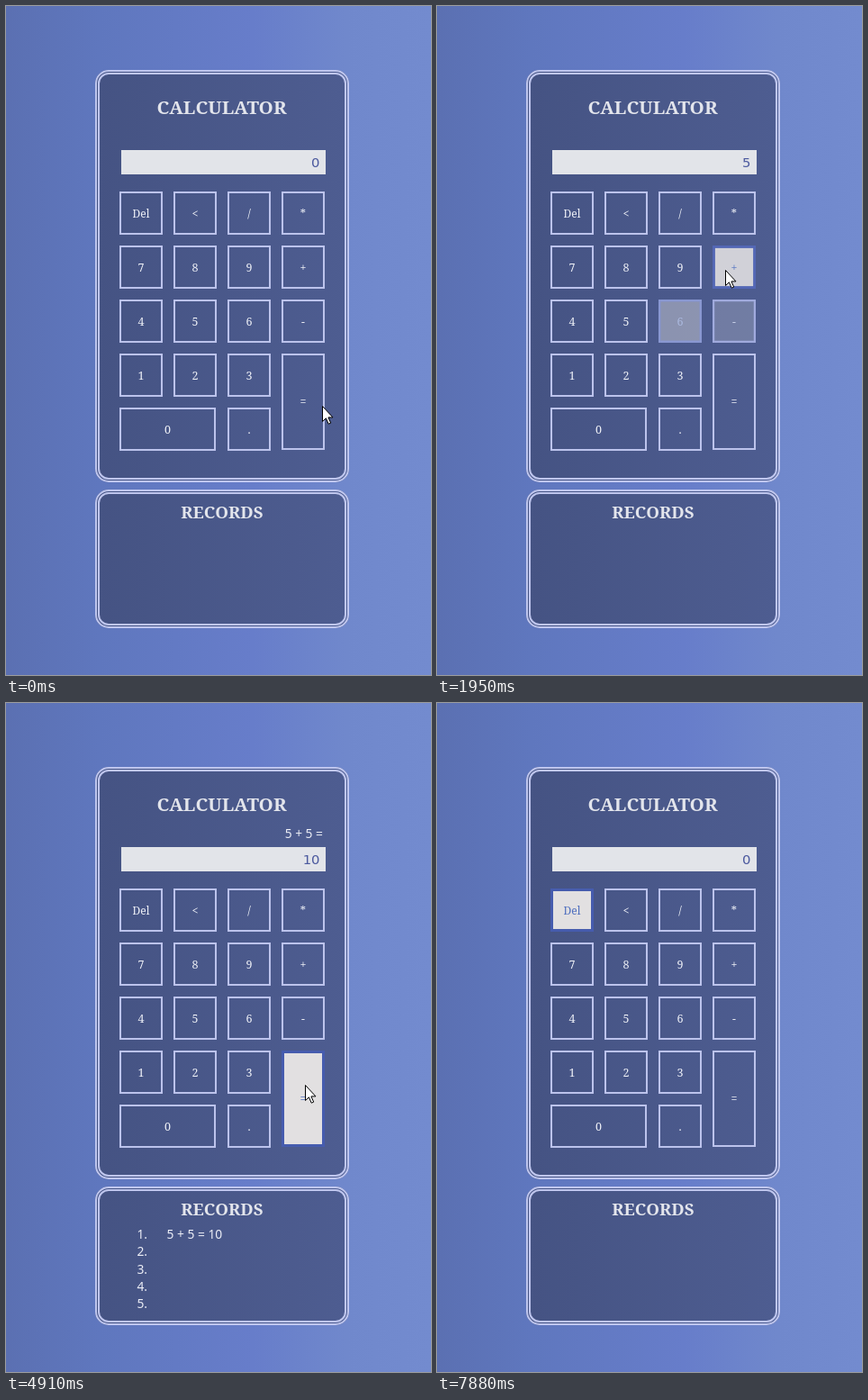
An HTML page that plays this animation: 472 by 743 pixels, repeating every 8 s.

```html
<!DOCTYPE html>
<html lang="en">
<head>
<meta charset="utf-8">
<title>Calculator</title>
<style>
  html, body { margin: 0; width: 100%; height: 100%; overflow: hidden; }
  svg { display: block; width: 100%; height: 100%; }
  .line { fill: none; stroke: #bfc6ee; stroke-width: 2; }
  .head { font: bold 20.7px "Noto Serif", serif; fill: #e3e5ec; text-anchor: middle; }
  .key { font: 12.5px "Noto Serif", serif; text-anchor: middle; }
  .note { font: 13.8px "Noto Sans", sans-serif; fill: #eceef6; }
  .end { text-anchor: end; }
  #display { font: 14.8px "DejaVu Sans", sans-serif; fill: #4c5a9f; }
</style>
</head>
<body>
<svg viewBox="0 0 472 743" preserveAspectRatio="none">
  <defs>
    <linearGradient id="sky">
      <stop offset="0" stop-color="#5b70b2"/>
      <stop offset=".22" stop-color="#5f77be"/>
      <stop offset=".58" stop-color="#677dca"/>
      <stop offset=".8" stop-color="#7088cc"/>
      <stop offset="1" stop-color="#738bcf"/>
    </linearGradient>
    <linearGradient id="panel">
      <stop offset="0" stop-color="#455383"/>
      <stop offset="1" stop-color="#4e5d91"/>
    </linearGradient>
  </defs>
  <rect width="472" height="743" fill="url(#sky)"/>
  <g id="panels"></g>
  <text class="head" x="239.5" y="120">CALCULATOR</text>
  <text class="head" x="240" y="569" style="font-size:18.8px">RECORDS</text>
  <rect x="128" y="160" width="227" height="27" fill="#e2e4e9"/>
  <text id="display" class="end" x="348.5" y="179"></text>
  <text id="expr" class="note end" x="352" y="150"></text>
  <g id="keys"></g>
  <g id="records"></g>
  <circle id="press" r="12.5" fill="#f1ef52"/>
  <path id="arrow" d="M.5 .5V17.5L4.4 13.8 7.2 20.2 9.7 19.1 6.9 12.9H12Z" fill="#fff" stroke="#000"/>
</svg>
<script>
const LOOP = 8000, RESET = 7790, STEP = 10, RISE = 90, FALL = 350;
const $ = id => document.getElementById(id);

function add(parent, tag, attrs, text = '') {
  const el = document.createElementNS('http://www.w3.org/2000/svg', tag);
  for (const name in attrs) el.setAttribute(name, attrs[name]);
  el.textContent = text;
  return parent.appendChild(el);
}

for (const [y, h] of [[71, 458], [537, 154]]) {
  add($('panels'), 'rect', { x: 99, y, width: 282, height: h, rx: 15, fill: 'url(#panel)' });
  for (const d of [1, 4])
    add($('panels'), 'rect', { class: 'line', x: 99 + d, y: y + d, width: 282 - 2 * d, height: h - 2 * d, rx: 15 - d });
}

const keys = [];
['Del < / *', '7 8 9 +', '4 5 6 -', '1 2 3 =', '0 _ .'].forEach((row, r) =>
  row.split(' ').forEach((label, c) => {
    if (label === '_') return;
    const x = 126 + 60 * c, y = 206 + 60 * r;
    const w = label === '0' ? 107 : 48, h = label === '=' ? 107 : 48;
    const box = add($('keys'), 'rect', {});
    const text = add($('keys'), 'text', { class: 'key', x: x + w / 2, y: y + h / 2 + 4.7 }, label);
    if (label === 'Del') text.style.fontSize = '12px';
    keys.push({ x, y, w, h, box, text, levels: [] });
  }));

const rows = [0, 1, 2, 3, 4].map(i => {
  const y = 595 + 19.25 * i;
  add($('records'), 'text', { class: 'note end', x: 157, y }, i + 1 + '.');
  return add($('records'), 'text', { class: 'note', x: 178.5, y });
});

// Pointer path: time, x, y
const path = [
  [0, 351, 444], [280, 290, 404], [560, 213, 354], [880, 213, 354], [1300, 245, 356],
  [1600, 283, 352], [1700, 283, 350], [1800, 306, 341], [1880, 318, 313], [1950, 320, 293],
  [2100, 324, 290], [2500, 324, 290], [2650, 320, 318], [2720, 305, 340], [2900, 214, 352],
  [3130, 214, 354], [3235, 234, 360], [3260, 246, 363], [3330, 285, 375], [3470, 304, 386],
  [3700, 322, 405], [4170, 332, 424], [4910, 332, 424], [5150, 325, 360], [5300, 322, 296],
  [5440, 320, 290], [5560, 290, 288], [5800, 225, 284], [6160, 211, 281], [6350, 211, 281],
  [6700, 290, 372], [6900, 318, 415], [7130, 331, 428], [LOOP, 331, 428]
];

// Time of press and release
const presses = [[700, 810], [2370, 2490], [2980, 3090], [4260, 4400], [5350, 5450], [6190, 6290], [7260, 7400]];

// Start time, display, expression, records
const sum = '5 + 5 = 10';
const states = [
  [0, '0', '', []], [810, '5', '', []], [2490, '5', '5 +', []],
  [4400, '10', '5 + 5 =', [sum]], [5450, '10', '10 +', [sum]], [6290, '8', '10 +', [sum]],
  [7400, '18', '10 + 8 =', [sum, '10 + 8 = 18']], [RESET, '0', '', []]
];

const slope = (i, k) => (path[i + 1][k] - path[i][k]) / (path[i + 1][0] - path[i][0]);

// Harmonic tangents keep the curve free of overshoot
function tangent(i, k) {
  if (i === 0 || i === path.length - 1) return 0;
  const a = slope(i - 1, k), b = slope(i, k);
  return a * b > 0 ? 2 * a * b / (a + b) : 0;
}

function pointer(t) {
  if (t >= RESET) return [150, 230];
  const i = path.findIndex(p => p[0] > t) - 1;
  const d = path[i + 1][0] - path[i][0], u = (t - path[i][0]) / d, v = 1 - u;
  return [1, 2].map(k =>
    path[i][k] * v * v * (1 + 2 * u) + path[i + 1][k] * u * u * (3 - 2 * u) +
    d * u * v * (tangent(i, k) * v - tangent(i + 1, k) * u));
}

// Hover strength of every key over the loop
for (let t = 0; t <= LOOP; t += STEP) {
  const [px, py] = pointer(Math.min(t, LOOP - 1));
  for (const k of keys) {
    const over = px >= k.x && px < k.x + k.w && py >= k.y && py < k.y + k.h;
    const last = t === 0 || t === RESET ? 0 : k.levels[k.levels.length - 1];
    const next = t === 0 || t === RESET ? 0 : last + (over ? STEP / RISE : -STEP / FALL);
    k.levels.push(Math.max(0, Math.min(1, next)));
  }
}

const mix = (a, b, u) => `rgb(${a.map((v, i) => Math.round(v + (b[i] - v) * u))})`;

function draw(t) {
  const slot = Math.floor(t / STEP);
  for (const k of keys) {
    const u = k.levels[slot], lw = 2 + u;
    const attrs = {
      x: k.x + lw / 2, y: k.y + lw / 2, width: k.w - lw, height: k.h - lw, 'stroke-width': lw,
      stroke: mix([188, 195, 236], [70, 92, 174], u),
      fill: '#e2e0e1', 'fill-opacity': u
    };
    for (const name in attrs) k.box.setAttribute(name, attrs[name]);
    k.text.setAttribute('fill', mix([240, 242, 248], [78, 110, 190], u));
  }

  const [, shown, expr, list] = states.filter(s => s[0] <= t).pop();
  $('display').textContent = shown;
  $('expr').textContent = expr;
  $('records').style.display = list.length ? '' : 'none';
  rows.forEach((row, i) => row.textContent = list[i] || '');

  const [x, y] = pointer(t);
  $('arrow').setAttribute('transform', `translate(${Math.round(x)} ${Math.round(y)})`);
  $('arrow').style.display = t < RESET ? '' : 'none';

  const press = presses.find(([down, up]) => t >= down && t < up + 80);
  $('press').setAttribute('cx', x);
  $('press').setAttribute('cy', y - .5);
  $('press').setAttribute('opacity', press ? .88 * Math.min(1, 1 - (t - press[1]) / 80) : 0);
}

let start;
function tick(now) {
  start ??= now;
  draw(Math.max(0, now - start) % LOOP);
  requestAnimationFrame(tick);
}
draw(0);
requestAnimationFrame(tick);
</script>
</body>
</html>
```
